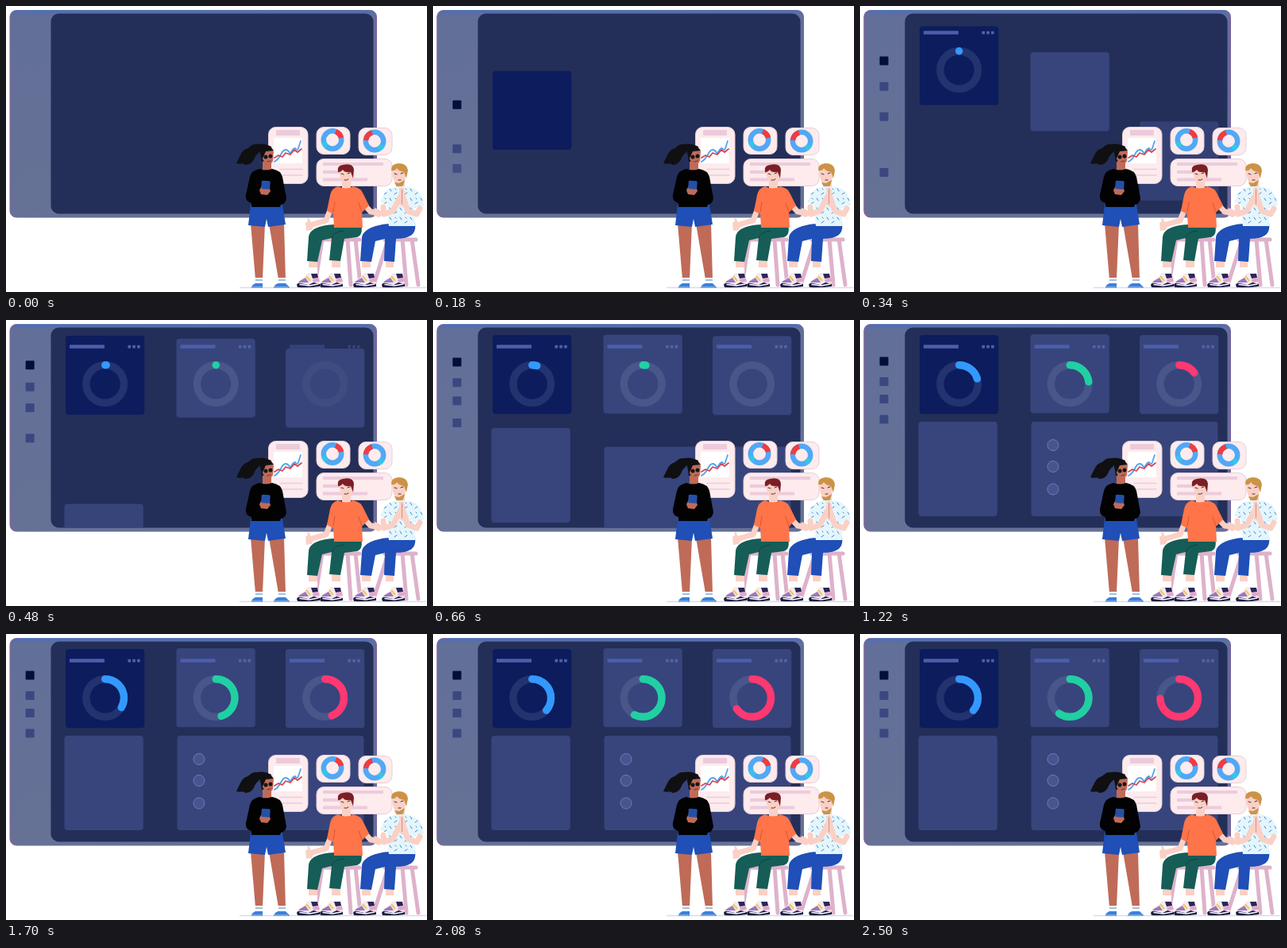
Animation, 530 px wide and 360 px high, one loop 2720 ms. Source, as an HTML page:

```html
<!DOCTYPE html>
<html lang="en">
<head>
<meta charset="utf-8">
<style>
  html, body { margin: 0; width: 100%; height: 100%; overflow: hidden; background: #fff; }
  svg { display: block; width: 530px; height: 360px; }
  .skin { fill: #fbd0c5; }
  .brown { fill: #bf6b58; }
  .line { fill: none; stroke-linecap: round; stroke-linejoin: round; }
  .bubble { fill: #fdebed; stroke: #e8cfd6; }
  .bar { fill: #eccbdc; }
</style>
</head>
<body>
<svg viewBox="0 0 530 360">
  <defs>
    <linearGradient id="frame" x2="0" y2="1">
      <stop offset="0" stop-color="#4c6fba"/>
      <stop offset=".025" stop-color="#626f98"/>
      <stop offset="1" stop-color="#667195"/>
    </linearGradient>
    <linearGradient id="edge">
      <stop offset="0" stop-color="#93609f"/>
      <stop offset=".04" stop-color="#5874b4"/>
      <stop offset=".97" stop-color="#5f6ba6"/>
      <stop offset="1" stop-color="#7d5fa5"/>
    </linearGradient>
    <clipPath id="screen"><rect x="56.5" y="9.5" width="406" height="252" rx="10"/></clipPath>
    <pattern id="dashes" width="13" height="12" patternUnits="userSpaceOnUse">
      <path d="M2 2l2 3M8 9l3-2M9 2l1 1" stroke="#3d83cf" class="line"/>
    </pattern>
    <g id="shoe">
      <path d="M14 0h12l3 14H1q1-5 8-8z" fill="#f4eaf3"/>
      <path d="M18 1h8l1 5-7 1z" fill="#2b2657"/>
      <path d="M12 4l5 6" stroke="#f3c84b" stroke-width="2"/>
      <path d="M20 8l8-2 1 5-8 1z" fill="#e3a5cc"/>
      <path d="M4 10l7-4 4 6H2z" fill="#9b79b8"/>
      <path d="M0 15q1-3 5-2l10 2 6-3 8 2v3q-14 2-28 1z" fill="#1d1b45"/>
      <path d="M4 14.5l12 1.5 11-2" class="line" stroke="#fff" stroke-width="1.5"/>
    </g>
  </defs>

  <rect x="5" y="5.5" width="461.5" height="260.5" rx="8" fill="url(#frame)" stroke="url(#edge)"/>
  <rect x="56.5" y="9.5" width="406" height="252" rx="10" fill="#232f58"/>
  <g id="menu"></g>
  <g id="board" clip-path="url(#screen)"></g>

  <!-- floating reports -->
  <g>
    <rect class="bubble" x="330.5" y="152.5" width="49.5" height="71" rx="9"/>
    <rect class="bar" x="340" y="156" width="30" height="7" rx="1"/>
    <path fill="#fff" d="M337 166h36v32h-36z"/>
    <path class="line" stroke="#4fa5ee" stroke-width="1.8" d="M338 196q5-3 8-9t6-6q3 0 6 5 3-7 6-7 3 4 4 0l3-9"/>
    <path class="line" stroke="#d94452" stroke-width="1.8" d="M338 191l5-3 5 2 4-5 6 2 5-6 4 3 5-4"/>
    <path class="line" stroke="#eccbdc" stroke-width="1.5" d="M345 205.5h28M345 213h28"/>
    <rect class="bubble" x="391" y="152.5" width="42" height="34" rx="9"/>
    <rect class="bubble" x="444" y="153.5" width="42" height="34" rx="9"/>
    <rect class="bubble" x="391" y="192.5" width="95" height="34" rx="9"/>
    <path class="bar" d="M399 197h76v4h-76zM399 207h37v4h-37zM399 216.5h56v4h-56z"/>
    <g fill="none" stroke-width="6.5">
      <circle cx="411" cy="168.5" r="11.2" stroke="#51a8f5"/>
      <path d="M415 158a11.2 11.2 0 0 1 7 8" stroke="#f23b3f"/>
      <path d="M400 171a11.2 11.2 0 0 0 4 6" stroke="#35c5e8"/>
      <circle cx="464" cy="170" r="11.2" stroke="#51a8f5"/>
      <path d="M453 169a11.2 11.2 0 0 1 8-9.7" stroke="#f23b3f"/>
      <path d="M469 180a11.2 11.2 0 0 0 5-5" stroke="#35c5e8"/>
    </g>
  </g>
  <path d="M294 354.5h235" stroke="#cfe0f3" stroke-width="1.5"/>

  <!-- standing woman -->
  <g>
    <path class="brown" d="M308 274h18l-3 70h-9zM331 274h19l2 70h-9z"/>
    <path fill="#fff" d="M314 342h9v9h-9zM343 342h9v9h-9z"/>
    <path stroke="#3f80d8" d="M314 345h9M343 345h9"/>
    <path fill="#3f80d8" d="M314 349h9v6h-14q0-4 5-6zM343 349h9l5 5-1 1h-19q1-5 6-6z"/>
    <path class="line" stroke="#a9cdf5" d="M310 354h12M338 354h17"/>
    <path fill="#1f4fb7" d="M308 250h40l4 25-22 3-2-10-2 10-21-2z"/>
    <path class="brown" d="M323 194h11v14h-11z"/>
    <path fill="#101013" d="M334 177c-7-4-14-4-18-3-8-1-9 5-14 6-6 2-9 13-12 18 5 2 9-1 11 2 7 0 11-5 12-9 1-3 4-5 7-8l2 13 9-1 3-16z"/>
    <path class="brown" d="M322 185q3-8 11-6l4 4-1 12q-3 6-8 4-6-4-6-14z"/>
    <path fill="#101013" d="M320 185q3-11 13-8l4 5-10 1-4 9z"/>
    <path class="line" stroke="#15151b" stroke-width="5" d="M327 190h0M333 189h0"/>
    <path class="line" stroke="#7c2631" d="M329 196l4-1"/>
    <path fill="#020203" d="M319 205q8 3 16 0 11 2 13 10l5 27q-1 7-7 8l-1 3h-36v-5q-8-2-7-10l5-23q2-8 12-10z"/>
    <path class="brown" d="M319 232l3-6 9 1 2 6-4 5-8-1z"/>
    <rect x="321.5" y="220" width="11" height="10.5" rx="1.5" fill="#2450a8" transform="rotate(4 327 225)"/>
  </g>

  <!-- stools -->
  <path class="line" stroke="#deb2cb" stroke-width="5" d="M396 294h49M398 294l-9 57M430 294l4 57M440 294l6 57M477 294h39M481 294l-18 57M499 294l5 57M511 294l8 57"/>

  <!-- seated man, right -->
  <g>
    <path class="skin" d="M448 318h11v13h-11zM478 318h10v13h-10z"/>
    <path fill="#fff" d="M448 329h11v9h-11zM478 329h10v9h-10z"/>
    <path fill="#1f4fb7" d="M484 274c-19 1-35 7-36 18l-2 29 14 1 5-26 12-3-1 28 13 1 2-29c16 0 26-5 24-19z"/>
    <path class="skin" d="M491 214h11v19h-11z"/>
    <path class="skin" d="M486 204q9-7 18 1l-2 17q-3 7-9 4-7-5-7-22z"/>
    <path fill="#cc9346" d="M485 207q-1-8 9-9 11 0 12 9l-2 10-3-8q-7-1-9-5-2 4-7 3zM489 222l6 1 7-4-2 7q-5 4-9 0z"/>
    <path class="line" stroke="#43313b" d="M489 211l3 1M497 211l3-1M494 219h3"/>
    <path id="shirt" fill="#e4f6fc" d="M486 229q12-4 25 0 9 3 12 11l3 11-12 3 1 23h-33l-2-27-8-3q3-15 14-18z"/>
    <use href="#shirt"/>
    <path fill="url(#dashes)" d="M486 229q12-4 25 0 9 3 12 11l3 11-12 3 1 23h-33l-2-27-8-3q3-15 14-18z"/>
    <path class="line" stroke="#fbd0c5" stroke-width="7" d="M475 253l1 9 11-4 9-17M521 255l-4 7-11-4-6-16"/>
    <path class="skin" d="M493 247l3-17q3-4 5 0l4 17-6 6z"/>
    <path class="line" stroke="#d78f86" d="M498.5 231v18"/>
  </g>

  <!-- seated man, left -->
  <g>
    <path class="skin" d="M381 318h11v13h-11zM410 318h11v13h-11z"/>
    <path fill="#fff" d="M381 329h11v9h-11zM410 329h11v9h-11z"/>
    <path fill="#165d57" d="M417 275c-20 0-35 5-36 16l-2 30 13 1 6-27 12-3-3 28 14 1 5-28 16-2q8-3 5-16z"/>
    <path class="line" stroke="#0d4541" d="M410 292q2-8 15-9"/>
    <path class="skin" d="M423 215h11v16h-11z"/>
    <path class="skin" d="M419 206q9-8 18 0l-2 15q-4 6-9 3-6-4-7-18z"/>
    <path fill="#7b1e25" d="M418 209q-2-8 6-9 13-3 14 6l-1 11-3-8q-8 1-10-3-3 4-6 3z"/>
    <path class="line" stroke="#43313b" d="M422 211l3 1M430 211l3-1M426 219q3 1 5-1"/>
    <path class="line" stroke="#fbd0c5" stroke-width="7" d="M408 257l-5 13-21 6M450 249l9 10 9 1"/>
    <path class="skin" d="M377 273l3-2-1-4 3 1 2 5 4 2-3 7-7 1zM464 254l7 3 4 6-6 3-7-3z"/>
    <path fill="#ff7449" d="M418 227q10 5 19 0 10 2 13 10l7 14-9 9 1 19h-36l-1-17-8-4 4-20q2-9 10-11z"/>
    <path class="line" stroke="#d9552f" d="M412 259l2-12M448 259l-4-11"/>
  </g>
  <use href="#shoe" x="366" y="336"/>
  <use href="#shoe" x="395" y="336"/>
  <use href="#shoe" x="437" y="336"/>
  <use href="#shoe" x="473" y="336"/>
</svg>
<script>
const LOOP = 2720;
const menu = document.getElementById('menu');
const board = document.getElementById('board');
const clamp = v => Math.max(0, Math.min(1, v));
const smooth = v => (v = clamp(v)) * v * (3 - 2 * v);

function add(parent, tag, attrs = {}) {
  const node = document.createElementNS('http://www.w3.org/2000/svg', tag);
  for (const key in attrs) node.setAttribute(key, attrs[key]);
  return parent.appendChild(node);
}
const rect = (parent, x, y, width, height, rx, fill) =>
  add(parent, 'rect', { x, y, width, height, rx, fill });

// Waits below its place, fades in, then glides up with exponential decay.
function rise(node, age, distance, tau, lead, fade) {
  const dy = distance * Math.exp(-Math.max(0, age) / tau);
  node.setAttribute('transform', `translate(0 ${dy.toFixed(2)})`);
  node.setAttribute('opacity', clamp((age + lead) / fade));
}

const icons = [[52, 140], [77.5, 178], [99.5, 234], [125, 317]].map(([y, start], i) => {
  const node = add(menu, 'g');
  rect(node, 24.7, y - 5.5, 11, 11, 1, i ? '#3b4880' : '#050e3b');
  return { node, start };
});

const cards = [
  { x: 75, y: 19, start: 130, fill: '#0c1c5d', track: '#233370', color: '#3399ff', angle: 131, from: 300, span: 1700 },
  { x: 214.5, y: 18, start: 259, color: '#20d0a2', angle: 215, from: 425, span: 1875 },
  { x: 352, y: 19, start: 339, color: '#ff3871', angle: 268, from: 719, span: 1745 },
  { x: 73.5, y: 128, start: 465, h: 119 },
  { x: 215.5, y: 128, start: 562, w: 235, h: 119 }
];
for (const card of cards) {
  const { x, y, w = 99.3, h = 99.3, fill = '#37457c', track = '#48568a', color } = card;
  card.node = add(board, 'g');
  rect(card.node, x, y, w, h, 4, fill);
  if (!color) continue;
  // The content fades in at its final place while the card still moves.
  card.content = add(board, 'g');
  rect(card.content, x + 5, 31.3, 44, 4.5, .5, '#4c5daa');
  for (let i = 0; i < 3; i++) rect(card.content, x + 78.5 + i * 5.8, 31.8, 3.6, 3.6, .5, '#5262a8');
  const cx = x + 49.7, cy = 80.5;
  const ring = { cx, cy, r: 23.8, fill: 'none', 'stroke-width': 9.4 };
  add(card.content, 'circle', { ...ring, stroke: track });
  card.arc = add(card.content, 'circle', {
    ...ring, stroke: color, pathLength: 360,
    'stroke-linecap': 'round', transform: `rotate(-90 ${cx} ${cy})`
  });
}

const bullets = [157.5, 184.5, 213].map(cy =>
  add(cards[4].node, 'circle', { cx: 243, cy, r: 7, fill: '#46558f', stroke: '#6c7ab5' }));

function draw(t) {
  // Everything rests hidden for the first moment of the loop.
  if (t < 60) t = 0;
  for (const { node, start } of icons) rise(node, t - start, 105, 110, 120, 80);
  for (const card of cards) {
    const age = t - card.start;
    rise(card.node, age, 130, 70, 70, 90);
    if (!card.arc) continue;
    card.content.setAttribute('opacity', clamp((age - 100) / 100));
    const sweep = card.angle * smooth((t - card.from) / card.span);
    card.arc.setAttribute('stroke-dasharray', `${Math.max(.1, sweep)} 400`);
    card.arc.setAttribute('opacity', card.track || t >= card.from ? 1 : 0);
  }
  bullets.forEach((node, i) => node.setAttribute('opacity', clamp((t - 760 - i * 80) / 120)));
}

const begin = performance.now();
function tick() {
  draw((performance.now() - begin) % LOOP);
  requestAnimationFrame(tick);
}
tick();
</script>
</body>
</html>
```
